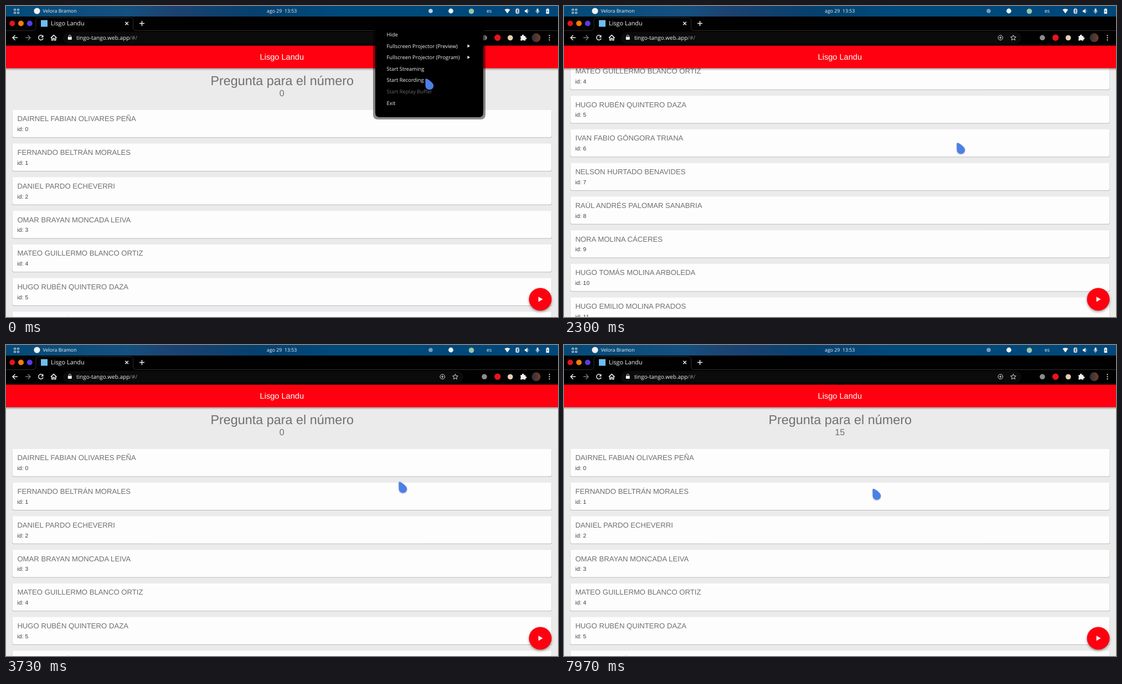
An HTML page that plays this animation: 997 px wide and 562 px high, repeating every 8000 ms.

```html
<!DOCTYPE html>
<html lang="es">
<head>
<meta charset="utf-8">
<title>Lisgo Landu</title>
<style>
  html, body { margin: 0; width: 100%; height: 100%; overflow: hidden; background: #ebebeb; }
  svg { display: block; width: 997px; height: 562px; text-rendering: geometricPrecision; }
  .page { font-family: "Liberation Sans", Arial, sans-serif; fill: #707070; }
  .ui { font-family: "Open Sans", "Noto Sans", sans-serif; fill: #f2f2f2; }
  .name { font-size: 13.14px; }
  .id { font-size: 10.22px; letter-spacing: .18px; fill: #3c3c3c; }
  .mid { text-anchor: middle; }
  .line { fill: none; stroke: #eee; stroke-width: 1.5; }
  .thin { fill: none; stroke: #ddd; stroke-width: 1; }
  #fab { filter: drop-shadow(0 2px 2px rgba(0, 0, 0, .4)); }
  #arrow, #hand { filter: drop-shadow(0 1px 1px rgba(40, 50, 90, .4)); }
</style>
</head>
<body>
<svg viewBox="0 0 997 562">
  <defs>
    <linearGradient id="sky">
      <stop offset="0" stop-color="#034a78"/>
      <stop offset=".22" stop-color="#145080"/>
      <stop offset=".3" stop-color="#1c426f"/>
      <stop offset=".45" stop-color="#06406e"/>
      <stop offset=".6" stop-color="#004a7b"/>
      <stop offset="1" stop-color="#00477a"/>
    </linearGradient>
    <linearGradient id="shade" x2="0" y2="1">
      <stop offset="0" stop-opacity=".35"/>
      <stop offset="1" stop-opacity="0"/>
    </linearGradient>
    <linearGradient id="photo">
      <stop offset="0" stop-color="#27323c"/>
      <stop offset="1" stop-color="#7a3c28"/>
    </linearGradient>
    <clipPath id="round"><circle cx="965" cy="530" r="20.5"/></clipPath>
  </defs>

  <rect width="997" height="562" fill="#ebebeb"/>
  <g id="list" class="page">
    <text class="mid" x="498.7" y="143" font-size="23.36">Pregunta para el número</text>
    <text id="count" class="mid" x="498.3" y="163.4" font-size="16.06">0</text>
  </g>

  <rect y="112" width="997" height="5" fill="url(#shade)"/>
  <rect y="71" width="997" height="41.4" fill="#fe000f"/>
  <text class="page mid" x="498.3" y="97.3" font-size="14.6" style="fill:#fff">Lisgo Landu</text>

  <g id="fab">
    <circle id="disc" cx="965" cy="530" r="20.5"/>
    <circle id="ripple" cx="963" cy="529" fill="#fff" clip-path="url(#round)"/>
    <path d="M961.6 525.2v9.4l7.9-4.7z" fill="#fff"/>
  </g>

  <!-- desktop bar -->
  <rect width="997" height="19" fill="url(#sky)"/>
  <g class="ui" font-size="8.8">
    <text x="66.5" y="12.4">Velora Bramon</text>
    <text x="471" y="12.4" xml:space="preserve">ago 29  13:53</text>
    <text x="868" y="12.4">es</text>
    <circle cx="56" cy="9" r="5.6"/>
    <circle id="tray" cx="767" cy="9" r="3.8"/>
    <circle cx="803.5" cy="9" r="4.4"/>
    <circle cx="840.5" cy="9.5" r="4.8" fill="#9cc4a4"/>
    <path class="thin" d="M14.5 5.5h3v2.5h-3zM20.5 5.5h3v2.5h-3zM14.5 11h3v2.5h-3zM20.5 11h3v2.5h-3z"/>
    <path d="M900.5 6.5q5-3 10 0l-5 7z"/>
    <rect x="920.5" y="4.5" width="6.5" height="9.5" rx="3.2"/>
    <path d="M921.8 7l4 4-2 1.8V5.8l2 1.7-4 4" fill="none" stroke="#0a4575" stroke-width=".8"/>
    <path d="M937 7.5h2l3-2.7v8.8l-3-2.7h-2z"/>
    <path class="thin" d="M943.3 6.8q1.5 2.3 0 4.7" opacity=".6"/>
    <rect x="958.5" y="4.5" width="3.2" height="6" rx="1.6"/>
    <path class="thin" d="M957 8.5q0 3.3 3 3.3t3-3.3M960 12v2"/>
    <path d="M975.5 5.5h1.5v-1h2.5v1h1.5v8.5h-5.5z"/>
    <path d="M978.6 7l-1.6 3h1.2l-.5 2.2 1.8-3h-1.2z" fill="#0a4575"/>
  </g>

  <!-- browser frame -->
  <rect y="19" width="997" height="52.6" fill="#010101"/>
  <path d="M0 44.5H48q6 0 6-6V26q0-5 5-5H224q5.5 0 5.5 5V38.5q0 6 6 6H997" fill="none" stroke="#2c2c2c"/>
  <rect x="103" y="47" width="723" height="21" rx="10.5" fill="#0b0b0b"/>
  <circle cx="11.3" cy="31.5" r="5" fill="#e8121c"/>
  <circle cx="27" cy="31.5" r="5" fill="#f97b0c"/>
  <circle cx="42.8" cy="31.5" r="5" fill="#583be8"/>
  <rect x="63" y="25.5" width="12" height="12" fill="#6fbdf0"/>
  <g class="ui">
    <text x="81" y="35.4" font-size="10.9">Lisgo Landu</text>
    <text x="127" y="60.7" font-size="10">tingo-tango.web.app<tspan fill="#8a8a8a">/#/</tspan></text>
    <path class="line" d="M215.3 28.7l5.6 5.6m0-5.6l-5.6 5.6M241 31.5h9m-4.5-4.5v9"/>
    <path class="line" d="M21 57.3h-9m4.5-4.5l-4.5 4.5 4.5 4.5"/>
    <path class="line" d="M35 57.3h9m-4.5-4.5l4.5 4.5-4.5 4.5" style="stroke:#777"/>
    <path class="line" d="M66.3 54.3a4.3 4.3 0 1 0 .8 4.2"/>
    <path d="M67.5 52.3v4.4h-4.4z"/>
    <path class="line" d="M81 57.6l5.2-5 5.2 5M82.7 56.5v5.3h2.3v-3.3h2.5v3.3h2.3v-5.3"/>
    <rect x="111.8" y="55.8" width="7" height="5.2" rx=".8"/>
    <path class="thin" d="M113.3 56v-1.5a2 2 0 0 1 4 0v1.5"/>
    <circle class="thin" cx="788.3" cy="57.3" r="4.3"/>
    <path class="thin" d="M786 57.3h4.6m-2.3-2.3v4.6"/>
    <path class="thin" d="M811.5 52.5l1.4 3.2 3.5.3-2.7 2.3.9 3.4-3.1-1.8-3.1 1.8.9-3.4-2.7-2.3 3.5-.3z"/>
    <circle cx="864" cy="57.3" r="4.8" fill="#8c8c8c"/>
    <circle cx="887.8" cy="57.3" r="5.7" fill="#e8151c"/>
    <circle cx="910.8" cy="57.5" r="4.8" fill="#e6cfb4"/>
    <path d="M929.3 54.2h2.7a1.8 1.8 0 1 1 3.4 0h2.8v2.7a1.7 1.7 0 1 1 0 3.3v2.3h-3a1.7 1.7 0 0 0-3 0h-2.9v-3a1.7 1.7 0 0 0 0-2.7z"/>
    <circle cx="957.5" cy="57.3" r="8" fill="url(#photo)"/>
    <circle cx="981.5" cy="53.3" r="1.1"/>
    <circle cx="981.5" cy="57.3" r="1.1"/>
    <circle cx="981.5" cy="61.3" r="1.1"/>
  </g>

  <g id="menu" class="ui" font-size="9.4">
    <path d="M663 19H866V196q0 9-9 9H672q-9 0-9-9z" opacity=".45" fill="#000"/>
    <path d="M667 19H862V193q0 8-8 8H675q-8 0-8-8z" fill="#000"/>
    <path d="M833.5 69.3v6l4.5-3zM833.5 89.8v6l4.5-3z"/>
  </g>

  <path id="arrow" d="M.4 2.5Q.4-.8 3.2.6Q8 3 11.3 6.2Q15.2 9.5 15.2 13.2A7.3 7 0 0 1 .6 13.2Z" fill="#4c80e8"/>
  <path id="hand" d="M0 1.8Q1.5-1 3.3 1.5L4.5 6Q7 4.8 8 6.5Q10.5 5.5 11 7.5Q13.8 7 14 10Q14.5 15 11.5 18L4 18.5Q1 15-2 11.5Q-2.5 8.5 1.5 10Z" fill="#4c80e8"/>
</svg>

<script>
const $ = id => document.getElementById(id);
const NS = 'http://www.w3.org/2000/svg';

function add(parent, tag, attrs, text = '') {
  const el = document.createElementNS(NS, tag);
  for (const key in attrs) el.setAttribute(key, attrs[key]);
  el.textContent = text;
  parent.append(el);
}

const names = [
  'DAIRNEL FABIAN OLIVARES PEÑA', 'FERNANDO BELTRÁN MORALES',
  'DANIEL PARDO ECHEVERRI', 'OMAR BRAYAN MONCADA LEIVA',
  'MATEO GUILLERMO BLANCO ORTIZ', 'HUGO RUBÉN QUINTERO DAZA',
  'IVAN FABIO GÓNGORA TRIANA', 'NELSON HURTADO BENAVIDES',
  'RAÚL ANDRÉS PALOMAR SANABRIA', 'NORA MOLINA CÁCERES',
  'HUGO TOMÁS MOLINA ARBOLEDA', 'HUGO EMILIO MOLINA PRADOS',
  'ELISA MARÍA PINZÓN ROBLEDO', 'DARÍO ALONSO LOZANO VERA',
  'CAMILA ANDREA BOTERO SOLÍS', 'ÓSCAR IGNACIO MURILLO PAZ'
];
names.forEach((name, i) => {
  const y = 188 + 60.75 * i, list = $('list');
  const box = { x: 11.5, width: 974, height: 49.3, rx: 3 };
  add(list, 'rect', { ...box, x: 11, width: 975, y: y + 1, fill: '#bcbcc2' });
  add(list, 'rect', { ...box, y, fill: '#fdfdfd' });
  add(list, 'text', { class: 'name', x: 20.4, y: y + 20.4 }, name);
  add(list, 'text', { class: 'id', x: 20.2, y: y + 38.2 }, 'id: ' + i);
});

['Hide', 'Fullscreen Projector (Preview)', 'Fullscreen Projector (Program)', 'Start Streaming',
 'Start Recording', 'Start Replay Buffer', 'Exit'].forEach((label, i) =>
  add($('menu'), 'text', { x: 687.5, y: 55.4 + 20.52 * i, fill: i == 5 ? '#666' : '#f2f2f2' }, label));

// Each key is [time, value, ...]
const scrollKeys = [[2000, 0], [2300, 328.5], [2520, 560], [2760, 560], [3070, 238], [3400, 0]];
const pointerKeys = [
  [250, 757, 131], [1030, 668, 134], [1170, 668, 134], [1470, 659, 143], [1950, 709, 247],
  [3740, 709, 247], [4230, 940, 508], [4370, 940, 508], [4800, 962, 528], [5870, 962, 528],
  [6670, 700, 275], [7500, 525, 185], [7970, 557, 259.5]
];
const linear = p => p, smooth = p => p * p * (3 - 2 * p);
const clamp = p => Math.max(0, Math.min(1, p));

function track(keys, t, ease) {
  let i = 0;
  while (i < keys.length - 2 && t >= keys[i + 1][0]) i++;
  const a = keys[i], b = keys[i + 1];
  const p = ease(clamp((t - a[0]) / (b[0] - a[0])));
  return a.slice(1).map((v, k) => v + (b[k + 1] - v) * p);
}

function draw(now) {
  const t = now % 8000;
  const [x, y] = track(pointerKeys, t, smooth);
  const [scroll] = track(scrollKeys, t, linear);
  const over = Math.hypot(x - 965, y - 530) < 20.5;
  const press = clamp((t - 4970) / 450);

  $('list').setAttribute('transform', `translate(0 ${-scroll})`);
  $('count').textContent = t < 5050 ? '0' : '15';
  $('menu').style.opacity = 1 - clamp((t - 100) / 150);
  $('tray').setAttribute('opacity', t < 250 ? .8 : .5);
  $('disc').setAttribute('fill', over ? '#f40012' : '#fe000f');
  $('ripple').setAttribute('r', 22 * press);
  $('ripple').setAttribute('opacity', .24 * (1 - press));
  for (const id of ['arrow', 'hand']) {
    $(id).setAttribute('transform', `translate(${x} ${y})`);
    $(id).style.display = (id == 'hand') == over ? '' : 'none';
  }
  requestAnimationFrame(draw);
}
draw(0);
</script>
</body>
</html>
```
